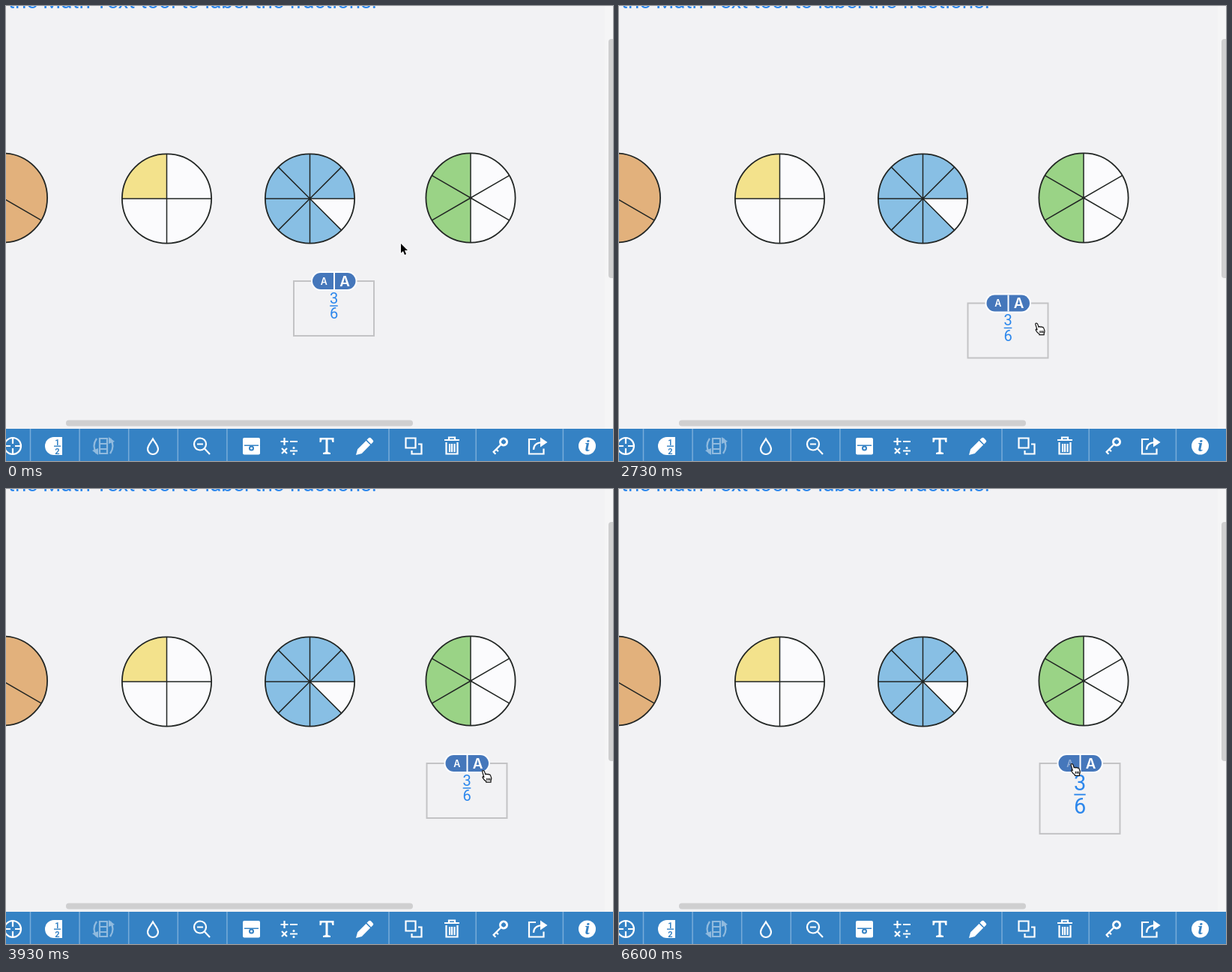
These frames come from a looping animation (810x607 px, 7660 ms). An HTML page:

```html
<!DOCTYPE html>
<html lang="en">
<head>
<meta charset="utf-8">
<title>Fraction labels</title>
<style>
  html, body { margin: 0; width: 100%; height: 100%; overflow: hidden; background: #f2f2f4; }
  svg { display: block; width: 100vw; height: 100vh; }
  text { font-family: Roboto, Arial, sans-serif; text-anchor: middle; }
  .blue { fill: #2c87ec; }
  .wheel { stroke: #222624; stroke-width: 1.8; fill: none; }
  .spokes { stroke-width: 1.5; }
  .pill text { font-family: Inter, sans-serif; font-weight: 600; fill: #fff; }
  .icons { fill: #fff; stroke: #fff; stroke-width: 0; }
  .icons .line { fill: none; stroke-width: 2.2; }
  .icons .ink { fill: #3582c4; }
</style>
</head>
<body>
<svg viewBox="0 0 810 607">
  <rect width="810" height="607" fill="#f2f2f4"/>
  <rect x="799" width="11" height="564" fill="#f5f5f6"/>
  <text class="blue" x="495" y="3.2" font-size="27.9" style="text-anchor:end">the Math Text tool to label the fractions.</text>
  <g id="wheels"></g>

  <rect x="804" y="44" width="9" height="319" rx="4" fill="#cfcfd0"/>
  <rect x="80" y="552.5" width="463" height="8" rx="4" fill="#cfcfd0"/>

  <rect y="564" width="810" height="43" fill="#3582c4"/>
  <path id="dividers" stroke="#78acd9" stroke-width="1.5"/>
  <g class="icons">
    <!-- aim, half, flip -->
    <g transform="translate(9 587)">
      <circle class="line" r="11"/>
      <path class="line" d="M0-11v8M0 3v8M-11 0h8M3 0h8"/>
    </g>
    <path d="M75 575H64a12 12 0 0 0 0 24h11z"/>
    <g class="ink" font-size="11" font-weight="700">
      <text x="68.5" y="585.5">1</text><rect x="64" y="586.5" width="9" height="1.4"/><text x="68.5" y="597.5">2</text>
    </g>
    <g opacity=".45" transform="translate(130 587)">
      <path class="line" d="M-5-10H5V10H-5zM-5-3H5M-5 4H5M-9-10q-7 10 0 20M9-10q7 10 0 20"/>
      <path d="M-15 6l8 6v-9zM15-6l-8-6v9z"/>
    </g>
    <!-- drop, zoom out -->
    <path class="line" d="M196 577.5c-3 5-7 9-7 13.500a7 7 0 0 0 14 0c0-4.500-4-8.500-7-13.500z"/>
    <circle class="line" cx="259" cy="584.5" r="8"/>
    <path class="line" d="M255 584.5h8M265 590.5l7 7.500"/>
    <!-- drawer, operators, text, pencil -->
    <rect x="316" y="576" width="23" height="22.5" rx="2"/>
    <path class="ink" d="M318 585.5h19v1.500h-19z"/>
    <circle class="ink" cx="327.5" cy="590" r="3.5"/>
    <circle cx="327.5" cy="590" r="1.5"/>
    <path class="line" d="M371.5 576v10M366.5 581h10M379 581h10M368 590l7 7M375 590l-7 7M379 593.5h10"/>
    <circle cx="384" cy="589.5" r="1.5"/><circle cx="384" cy="597.5" r="1.5"/>
    <path d="M418.5 576h19v6h-2l-1-3.500h-5v16.500l3.500 1v2h-10v-2l3.500-1v-16.500h-5l-1 3.500h-2z"/>
    <path transform="translate(467 599) rotate(-45)" d="M0 0l7-4H23V4H7zM24.500-4H28q2 0 2 2V2q0 2-2 2H24.500z"/>
    <!-- copy, bin, key, share, info -->
    <path class="line" d="M533.5 576.500h13v13h-13zM550 584.500h4.500v13h-13v-4.500"/>
    <path class="line" d="M585 579h20M591 578v-2.500h8v2.500M587.500 582v15.500h15v-15.500M592 584v11M595 584v11M598.500 584v11"/>
    <g class="line" transform="translate(664 581.5) rotate(135)">
      <circle r="4.500" stroke-width="3"/><path d="M5 0H20M14 0v-4M19 0v-4"/>
    </g>
    <path class="line" d="M707 578h-9v19.500h19.500v-7M704 592q0-9 11-10"/>
    <path d="M713 575.500l9.500 6.500-9.500 6.500z"/>
    <circle cx="775.5" cy="587" r="11.5"/>
    <text class="ink" x="775.5" y="594" style="font:italic 700 20px 'Noto Serif',serif">i</text>
  </g>

  <g id="label">
    <rect id="frame" width="107" fill="none" stroke="#c3c3c5" stroke-width="2"/>
    <g class="blue">
      <text id="top" x="53.5">3</text>
      <rect id="bar"/>
      <text id="bottom" x="53.5">6</text>
    </g>
    <g class="pill">
      <rect x="25" y="-11" width="57.5" height="22" rx="11" fill="#4577bb" stroke="#fff" stroke-width="4" paint-order="stroke"/>
      <rect x="53" y="-11" width="2" height="22" fill="#fff"/>
      <text id="smaller" x="40.4" y="4.8" font-size="12.5">A</text>
      <text id="larger" x="68.2" y="6.8" font-size="18.8">A</text>
    </g>
  </g>

  <g id="pointer">
    <path id="arrow" d="M0 0V12.500L3 10 5 15 7 14 5 9H9z" stroke="#fff" stroke-width="1.500" paint-order="stroke"/>
    <path id="hand" fill="#fff" stroke="#111" stroke-width="1.200" stroke-linejoin="round"
      d="M1 2Q1 .7 2.200.7 3.400.7 4 2L5.300 6Q6.400 4.600 7.600 6 9 4.800 10 6.300 11.300 5.500 12 7.200L13.200 10.500Q13.600 12.500 12.500 14.200V16.300H6.200V15Q3.500 13.600 1.800 10.500 1 9 2.300 8.800L3.400 9.600zM7.300 10.800v3M9.400 10.800v3M11.300 10.800v3"/>
  </g>
</svg>
<script>
const LOOP = 7660, STEP = 1000 / 15, STILL = 6600, RADIUS = 59.6;
const $ = id => document.getElementById(id);
const set = (id, attrs) => { for (const k in attrs) $(id).setAttribute(k, attrs[k]); };

// Wheel slices are counted clockwise from the first spoke.
function wheel(cx, cy, color, slices, turn, first, count) {
  const rim = i => {
    const a = (turn + i * 360 / slices) * Math.PI / 180;
    return `${RADIUS * Math.cos(a)} ${RADIUS * Math.sin(a)}`;
  };
  let fill = '', spokes = '';
  for (let i = 0; i < slices; i++) {
    spokes += `M0 0L${rim(i)}`;
    if (i >= first && i < first + count) fill += `M0 0L${rim(i)}A${RADIUS} ${RADIUS} 0 0 1 ${rim(i + 1)}z`;
  }
  return `<g class="wheel" transform="translate(${cx} ${cy})">
    <circle r="${RADIUS}" fill="#fbfbfd" stroke="none"/><path d="${fill}" fill="${color}" stroke="none"/>
    <path class="spokes" d="${spokes}"/><circle r="${RADIUS}"/></g>`;
}
$('wheels').innerHTML =
  wheel(-4.5, 256, '#e2b17c', 3, 30, 0, 3) +
  wheel(214.5, 257, '#f3e28c', 4, 0, 2, 1) +
  wheel(405.5, 257, '#88bfe4', 8, 0, 1, 7) +
  wheel(620, 256, '#9ad386', 6, 30, 1, 3);

const rules = (x, gap, n) => Array.from({ length: n }, (_, i) => `M${x + i * gap} 564v43`).join('');
set('dividers', { d: rules(32.5, 65.6, 5) + rules(511, 116.2, 3) });

const mix = (a, b, p) => a.map((v, i) => v + (b[i] - v) * p);
const span = (t, from, to) => Math.min(1, Math.max(0, (t - from) / (to - from)));
const easeOut = p => 1 - (1 - p) ** 3;

const drag = [
  { at: 2590, pos: [384, 367] },
  { at: 2730, pos: [465.5, 396.5] },
  { at: 3130, pos: [541.5, 372] },
  { at: 3530, pos: [561.5, 366] }
];
const labelAt = t => drag.reduce((pos, stop, i) =>
  i ? mix(pos, stop.pos, span(t, drag[i - 1].at, stop.at)) : stop.pos, null);

// The pointer comes in, carries the label one step ahead of it, then visits both buttons.
const GRIP = [76.5, 30];
function pointerAt(t) {
  const held = labelAt(t + STEP).map((v, i) => v + GRIP[i]);
  const inside = mix([527, 317], held, easeOut(span(t, 1795, 2530)));
  const onLarger = mix(inside, [633, 366], easeOut(span(t, 3865, 4060)));
  return mix(onLarger, [602, 366], easeOut(span(t, 5665, 6070)));
}

const clicks = [
  { at: 4460, by: 1, hold: 200 },
  { at: 4800, by: 1, hold: 200 },
  { at: 5130, by: 1, hold: 200 },
  { at: 6200, by: -1, hold: 330 },
  { at: 6600, by: -1, hold: 330 }
];

function draw(ms) {
  // Motion advances 15 times a second and rests at the end of the loop.
  const n = Math.floor((ms % LOOP + 6.7) / STEP);
  const t = Math.min(STILL, Math.floor(n * STEP / 10 + 1e-6) * 10);

  const done = clicks.filter(c => c.at <= t);
  const level = done.reduce((sum, c) => sum + c.by, 0);
  const pressed = by => done.some(c => c.by === by && t < c.at + c.hold);
  set('larger', { opacity: level === 3 || pressed(1) ? 0.4 : 1 });
  set('smaller', { opacity: pressed(-1) ? 0.4 : 1 });

  const grow = 20 * level + 0.9 * level ** 2;
  const size = 20 + grow * 0.427;
  const width = size * 0.53, height = 0.7 + size * 0.04;
  set('label', { transform: `translate(${labelAt(t)})` });
  set('frame', { height: 73 + grow });
  set('top', { y: 14 + 0.776 * size, 'font-size': size });
  set('bar', { x: 53.5 - width / 2, y: 13.7 + 0.966 * size - height / 2, width, height });
  set('bottom', { y: 12.1 + 1.897 * size, 'font-size': size });

  const overLabel = t > 2060;
  set('pointer', { transform: `translate(${pointerAt(t)})` });
  set('arrow', { visibility: overLabel ? 'hidden' : 'visible' });
  set('hand', { visibility: overLabel ? 'visible' : 'hidden' });
}

const start = performance.now();
function tick() {
  draw(performance.now() - start);
  requestAnimationFrame(tick);
}
tick();
</script>
</body>
</html>
```
